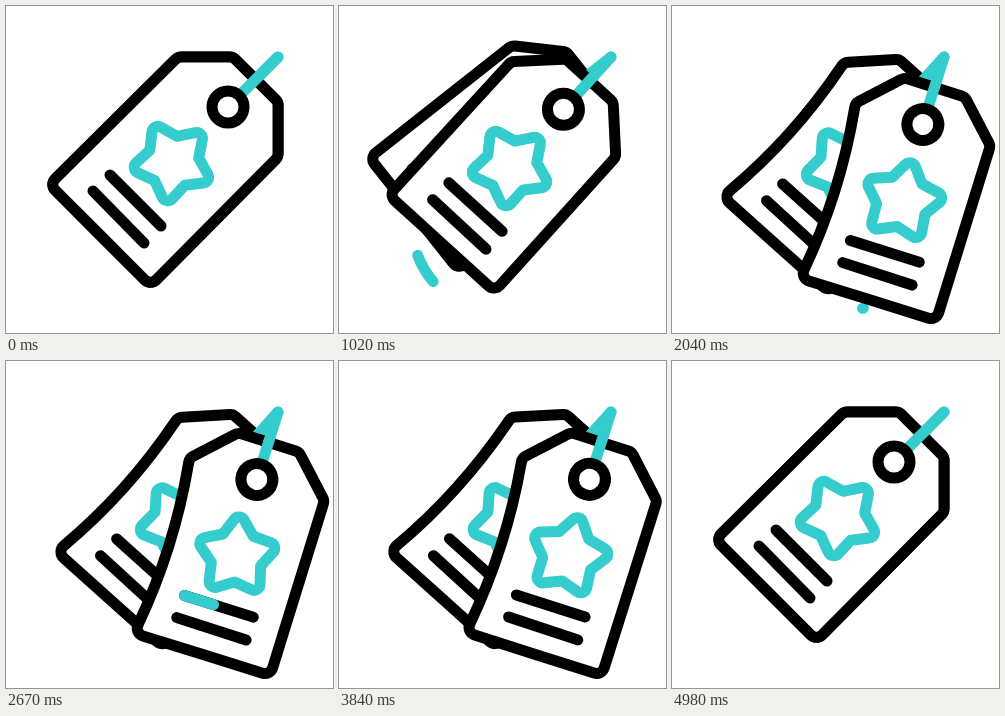
An HTML page with a canvas for the animation above (5400 ms loop, 327x327 px).

```html
<!DOCTYPE html>
<html lang="en">
<head>
<meta charset="utf-8">
<title>Swinging price tags</title>
<style>
html, body { margin: 0; width: 100%; height: 100%; overflow: hidden; background: #fff; }
canvas { display: block; width: 327px; height: 327px; }
</style>
</head>
<body>
<canvas></canvas>
<script>
const SIZE = 327, LOOP = 5400, STROKE = 11;
const TEAL = '#34cccc', BLACK = '#000', WHITE = '#fff';
const PIVOT = [272, 51], HOLE = [222, 101], STAR = [167, 156];
const LINES = [[104, 169, 155, 220], [87, 185, 138, 237]];
const RAD = Math.PI / 180;

const canvas = document.querySelector('canvas');
const ctx = canvas.getContext('2d');
const scale = window.devicePixelRatio || 1;
canvas.width = canvas.height = Math.round(SIZE * scale);

const sine = p => (1 - Math.cos(Math.PI * p)) / 2;
const cubic = p => p < 0.5 ? 4 * p ** 3 : 1 - 4 * (1 - p) ** 3;

function ramp(t, start, end, ease = sine) {
  return ease(Math.min(1, Math.max(0, (t - start) / (end - start))));
}

// Each key is [time, value, easing towards it].
function track(t, keys) {
  let value = keys[0][1];
  for (let i = 1; i < keys.length; i++) {
    const [end, to, ease] = keys[i];
    value += (to - keys[i - 1][1]) * ramp(t, keys[i - 1][0], end, ease);
  }
  return value;
}

const frontAngle = t => track(t, [[330, 0], [650, 6], [1740, -27.6], [3720, -27.6], [4570, 0, cubic]]);
const backAngle = t => track(t, [[330, 0], [800, 11.2], [1370, -3.1], [3780, -3.1], [4480, 0]]);
const bendAmount = t => track(t, [[1080, 0], [1500, 1], [3780, 1], [4480, 0]]);
const starSpin = t => 216 * ramp(t, 803, 4093);

function stroke(color) {
  ctx.strokeStyle = color;
  ctx.stroke();
}

function line(x1, y1, x2, y2, color) {
  ctx.beginPath();
  ctx.moveTo(x1, y1);
  ctx.lineTo(x2, y2);
  stroke(color);
}

function linePart([x1, y1, x2, y2], from, to, color) {
  if (to - from < 0.002) return;
  const dx = x2 - x1, dy = y2 - y1;
  line(x1 + dx * from, y1 + dy * from, x1 + dx * to, y1 + dy * to, color);
}

// The left side bows inwards with bend; the lower edge drops with sag.
function body(bend, sag) {
  const cx = 108 + 9 * bend, cy = 114.5 + 9 * bend;
  const left = [43.5 - 1.5 * sag, 178.5 + 1.8 * sag];
  const bottom = [144.5 - 1.5 * sag, 279.5 + 1.5 * sag];
  const middle = [(left[0] + bottom[0]) / 2, (left[1] + bottom[1]) / 2];
  ctx.beginPath();
  ctx.moveTo(...middle);
  ctx.arcTo(...left, cx, cy, 8);
  ctx.quadraticCurveTo(cx, cy, cx + (172 - cx) * 0.93, cy + (51 - cy) * 0.93);
  ctx.arcTo(172, 51, 227, 51, 8);
  ctx.arcTo(227, 51, 272, 96, 8);
  ctx.arcTo(272, 96, 272, 151, 8);
  ctx.arcTo(272, 151, ...bottom, 8);
  ctx.arcTo(...bottom, ...middle, 8);
  ctx.closePath();
  ctx.fillStyle = WHITE;
  ctx.fill();
  stroke(BLACK);
}

function star(spin, sag) {
  const x = STAR[0] + 1.5 * sag, y = STAR[1] + 3.5 * sag;
  const point = i => {
    const a = (-45 + spin + i * 36) * RAD, r = i % 2 ? 26 : 44;
    return [x + r * Math.cos(a), y + r * Math.sin(a)];
  };
  ctx.beginPath();
  ctx.moveTo(...point(-1));
  for (let i = 0; i < 10; i += 2) {
    ctx.arcTo(...point(i), ...point(i + 1), 6);
    ctx.lineTo(...point(i + 1));
  }
  ctx.closePath();
  stroke(TEAL);
}

function tag(angle, bend, sag, spin, sweeps) {
  ctx.save();
  ctx.translate(...PIVOT);
  ctx.rotate(angle * RAD);
  ctx.translate(-PIVOT[0], -PIVOT[1]);
  body(bend, sag);
  star(spin, sag);
  LINES.forEach(([x1, y1, x2, y2], i) => {
    const drop = 1.3 * sag;
    const bar = [x1, y1 + drop, x2, y2 + drop];
    line(...bar, BLACK);
    if (sweeps) linePart(bar, ...sweeps[i], TEAL);
  });
  line(...PIVOT, HOLE[0] + 13, HOLE[1] - 13, TEAL);
  ctx.beginPath();
  ctx.arc(...HOLE, 16, 0, 2 * Math.PI);
  stroke(BLACK);
  ctx.restore();
}

function trail(x, y, start, end, from, to) {
  if (to - from < 0.002) return;
  const at = f => (start + (end - start) * f) * RAD;
  ctx.beginPath();
  ctx.arc(x, y, 89, at(from), at(to), end < start);
  stroke(TEAL);
}

function draw(t) {
  ctx.setTransform(scale, 0, 0, scale, 0, 0);
  ctx.fillStyle = WHITE;
  ctx.fillRect(0, 0, SIZE, SIZE);
  ctx.lineWidth = STROKE;
  ctx.lineCap = ctx.lineJoin = 'round';

  trail(162, 218, 159.4, 70.7, ramp(t, 1550, 2070), ramp(t, 840, 1420));
  trail(155, 220, 66, 137, ramp(t, 4550, 4980), ramp(t, 4220, 4600));

  const bend = bendAmount(t);
  tag(backAngle(t), bend, 0, 0);
  tag(frontAngle(t), bend, bend, starSpin(t), [
    [ramp(t, 3042, 3640), ramp(t, 2400, 3000)],
    [ramp(t, 3230, 3730), ramp(t, 2740, 3340)]
  ]);
}

const began = performance.now();
function tick() {
  draw((performance.now() - began) % LOOP);
  requestAnimationFrame(tick);
}
tick();
</script>
</body>
</html>
```
